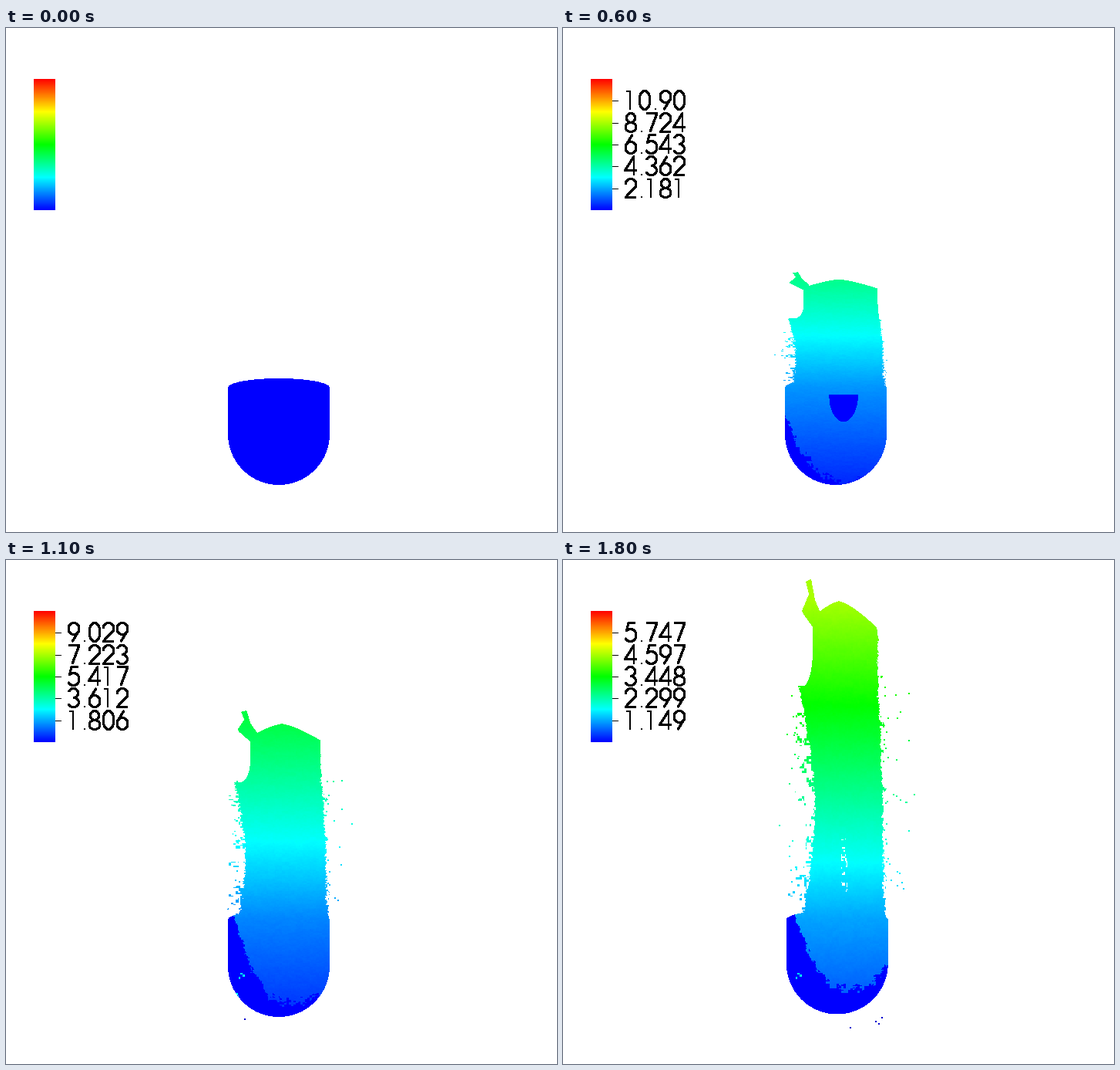
A matplotlib script for the animation above (1900 ms loop, 715 by 653 pixels).

```python
import numpy as np
import matplotlib.pyplot as plt
from matplotlib.animation import FuncAnimation
from matplotlib.collections import LineCollection
from matplotlib.colors import hsv_to_rgb
from matplotlib.path import Path

W, H, DPI = 715, 653, 100
FRAMES, INTERVAL = 19, 100
LAST = FRAMES - 1
LEFT, RIGHT, TOP, BOTTOM = 250, 470, 15, 625   # window holding the flow
RIM = 462
RISE = 22.7                                    # climb of the jet's top per step
PX = 72 / DPI
rng = np.random.default_rng(4)

xs = np.arange(LEFT, RIGHT) + 0.5
ys = np.arange(TOP, BOTTOM) + 0.5
X, Y = np.meshgrid(xs, ys)
GRID = np.column_stack([X.ravel(), Y.ravel()])

# Horn at the jet's left: x at the end, climb per step
HORN = [(315, 24.1), (319, 23.2), (310, 22.0), (313, 21.7),
        (332, 20.2), (336, 21.6), (327, 22.8), (322, 24.3)]


def blocks(size):
    n = rng.random((len(ys) // size + 1, len(xs) // size + 1))
    return n.repeat(size, 0).repeat(size, 1)[:len(ys), :len(xs)]


def texture(*sizes):
    return sum(blocks(s) for s in sizes) / len(sizes)


fine = texture(2, 4, 9)
coarse = texture(3, 6, 13)


def make_drops(n, edge, spread):
    """Rows of start x, sideways reach, climb per step, first step."""
    reach = spread * rng.exponential(1, n)
    return np.column_stack([np.full(n, edge), reach,
                            rng.uniform(1, 17, n), rng.uniform(6, 15, n)])


SPRAY = np.vstack([make_drops(45, 414, 12), make_drops(16, 304, -14)])
DRIPS = np.column_stack([rng.uniform(286, 414, 9), rng.uniform(9, LAST, 9)])


def rainbow(v):
    v = np.clip(v, 0, 1)
    one = np.ones_like(v)
    return hsv_to_rgb(np.stack([(1 - v) * 2 / 3, one, one], -1))


def cup_mask(t):
    cx = 354 + 0.6 * max(t - 15, 0)
    cy = 526 - 0.5 * max(t - 11, 0)
    side = np.abs(X - cx) / 66
    below = np.maximum(Y - cy, 0) / 66
    above = np.maximum(466 - Y, 0) / 12
    return np.hypot(side, below + above) < 1


def jet_mask(t, small, large):
    climb = (RIM - Y) / t
    crown = RISE - 2 * (np.abs(X - 358) / 51) ** 1.4

    # Bay under the horn, then a ragged left side down to the rim
    bay_x, bay_y, depth = 293 + t, 483 - 20.3 * t, 2.55 * t
    bay = np.hypot(np.maximum(X - bay_x, 0) / 13,
                   np.maximum(Y - bay_y, 0) / depth) < 1
    start = bay_y + depth
    s = np.clip((Y - start) / max(RIM - start, 1), 0, 1)
    left = 291 + 0.045 * t ** 2 + t * np.sin(np.pi * s) + 6 * s
    right = 411.5 - 4 * np.tanh((climb - 13) / 4)

    ragged = np.clip((Y - RIM + RISE * t - 25) / 60, 0, 1)
    shake = 5 * (small - 0.5)
    shreds = np.maximum(large - 0.58, 0)
    left = left - ragged * (shake + 75 * shreds * (s > 0.1))
    right = right + ragged * (shake + 18 * shreds)
    body = (climb < crown) & (Y < RIM + 6) & (X > left) & (X < right) & ~bay

    lean = 1.4 * (LAST - t)
    horn = Path([(x - lean, RIM - rate * t) for x, rate in HORN])
    mask = body | horn.contains_points(GRID).reshape(X.shape)
    if t > 12:
        slit = (np.abs(X - 365) < 4) & (climb > 1.5) & (climb < 5.6)
        mask &= ~(slit & (small > 0.66))
    return mask


def still_mask(t):
    """Slow liquid that gathers along the left wall and the bottom."""
    wall = np.abs(X - 375) / 85
    edge = 610 - 3 * t - min(15 * t, 140) * wall ** 2.5
    return (Y > RIM - 6) & (Y > edge + 30 * (coarse - 0.5))


def pocket_mask(t):
    """Dark pocket in the middle of the cup that shrinks away."""
    depth = 50 * (1 - (t / 11) ** 2)
    if depth <= 0:
        return np.zeros(X.shape, bool)
    shape = np.hypot((X - 364) / 19, (Y - 475) / depth) < 1
    return shape & (Y > 475) & (coarse > 0.75 - 0.1 * t)


def dot(img, x, y, color):
    i, j = int(round(y)) - TOP, int(round(x)) - LEFT
    if 0 <= i < len(ys) - 1 and 0 <= j < len(xs) - 1:
        img[i:i + 2, j:j + 2] = color


def scale_step(t):
    """Gap between labels, a sixth of the top speed; one brief surge."""
    if t == 8:
        return 7.0012
    return np.interp(t, [2, 6, 11, 14, 18],
                     [2.4898, 2.1809, 1.8058, 1.80565, 1.14932])


def flow(t):
    img = np.ones(X.shape + (3,))
    cup = cup_mask(t)
    if t == 0:
        img[cup] = (0, 0, 1)
        return img

    # Textures stretch along with the jet
    rows = ((RIM - ys) * LAST / t).astype(int) % len(ys)
    small, large = fine[rows], coarse[rows]

    speeds = [4.85 - 0.015 * t, 4.7 / np.sqrt(t), 0.5]
    profile = np.interp(ys, [RIM - RISE * t, 465, 590], speeds)
    profile /= 6 * scale_step(t)
    v = profile[:, None] + 0.012 * (small - 0.5)

    still = cup & still_mask(t)
    v[still | (cup & pocket_mask(t))] = 0
    if t > 10:
        v[still & (coarse > 0.87)] = 0.26
    mask = cup | jet_mask(t, small, large)
    img[mask] = rainbow(v[mask])

    for x, reach, rate, born in SPRAY:
        if t >= born:
            y = RIM - rate * t
            dot(img, x + reach * t / LAST, y, rainbow(np.interp(y, ys, profile)))
    for x, born in DRIPS:
        if 0 <= t - born < 4:
            dot(img, x, 590 + 6 * (t - born), (0, 0, 0.8))
    return img


def arc(cx, cy, rx, ry, a, b):
    s = np.radians(np.linspace(a, b, 28))
    return list(zip(cx + rx * np.cos(s), cy + ry * np.sin(s)))


# Thin round numerals in a 16 by 24 cell, y pointing down
GLYPHS = {
    "0": [arc(8, 12, 7, 12, 0, 360)],
    "1": [[(2, 0), (7, 0), (7, 24)]],
    "2": [arc(8, 7, 7, 7, 180, 390) + [(1, 24), (15, 24)]],
    "3": [arc(7.5, 6, 6, 6, 200, 450), arc(7.5, 18, 7, 6, -90, 160)],
    "4": [[(12, 24), (12, 0), (0.5, 18), (16, 18)]],
    "5": [[(14, 0), (5, 0)] + arc(7.5, 16, 7.5, 8, -130, 150)],
    "6": [[(10, 0)] + arc(8, 16.5, 7, 7.5, 210, 570)],
    "7": [[(1, 0), (15, 0), (6, 24)]],
    "8": [arc(8, 6, 5.5, 6, 0, 360), arc(8, 18, 7, 6, 0, 360)],
    "9": [arc(8, 7.5, 7, 7.5, 30, 390) + [(6, 24)]],
    ".": [[(4, 22), (4, 24)]],
}
TICKS = [236 - round(170 * k / 6) - 0.5 for k in range(1, 6)]


def label_strokes(text, x, y):
    strokes = []
    for ch in text:
        strokes += [np.array(line) + (x, y) for line in GLYPHS[ch]]
        x += 9 if ch == "." else 18
    return strokes


fig = plt.figure(figsize=(W / DPI, H / DPI), dpi=DPI, facecolor="white")
ax = fig.add_axes([0, 0, 1, 1])
ax.axis("off")

bar = rainbow(1 - (np.arange(170) + 0.5) / 170)[:, None]
ax.imshow(bar, extent=(36, 64, 236, 66), interpolation="nearest", aspect="auto")
view = ax.imshow(flow(0), extent=(LEFT, RIGHT, BOTTOM, TOP),
                 interpolation="nearest", aspect="auto")
ticks = LineCollection([[(64, y), (71, y)] for y in TICKS], colors="black",
                       linewidths=PX, antialiaseds=False)
labels = LineCollection([], colors="black", linewidths=2 * PX,
                        antialiaseds=False)
ax.add_collection(ticks)
ax.add_collection(labels)
ax.set_xlim(0, W)
ax.set_ylim(H, 0)


def draw(t):
    view.set_data(flow(t))
    ticks.set_visible(t > 0)
    strokes = []
    if t > 0:
        for k, y in enumerate(TICKS, 1):
            strokes += label_strokes(f"{k * scale_step(t):#.4g}", 80, y - 12)
    labels.set_segments(strokes)
    return view, ticks, labels


anim = FuncAnimation(fig, draw, frames=FRAMES, interval=INTERVAL, repeat=True)
plt.show()
```
